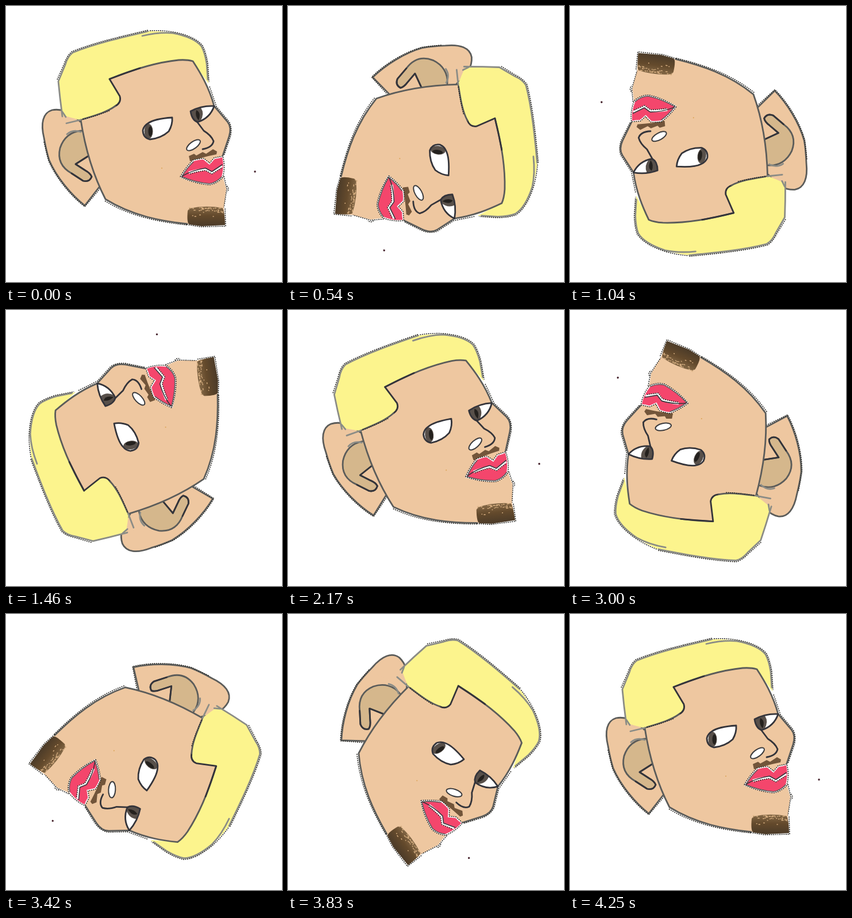
An HTML page that plays this animation: 480 px wide and 480 px high, repeating every 4.29 s.

```html
<!DOCTYPE html>
<html lang="en">
<head>
<meta charset="utf-8">
<title>Turning head</title>
<style>
  html, body { margin: 0; width: 100%; height: 100%; overflow: hidden; background: #fff; }
  svg { display: block; width: 100vw; height: 100vh; }
  .line { fill: none; stroke: #5b5c5a; stroke-width: 2.8; stroke-linecap: round; stroke-linejoin: round; }
  .soft { stroke: #8b8c86; }
  .dark { stroke: #34343a; }
  .thin { stroke-width: 1.6; }
  .rough { fill: none; stroke: #2b2a26; stroke-width: 1.6; stroke-dasharray: 2 1.6; }
  .skin { fill: #eec7a0; }
  .hair { fill: #fcf48d; }
  .lip { fill: #f4466c; }
  .white { fill: none; stroke: #fff; stroke-width: 4.5; stroke-linejoin: round; }
</style>
</head>
<body>
<svg viewBox="0 0 480 480">
  <defs>
    <linearGradient id="beardTone" x1="0" y1="0" x2="0" y2="1">
      <stop offset="0" stop-color="#866a48"/>
      <stop offset=".45" stop-color="#644a2c"/>
      <stop offset="1" stop-color="#4a3a28"/>
    </linearGradient>
    <path id="earEdge" d="M129 201C114 184 95 178 80 181C64 186 60 204 66 229Q70 252 75 268C88 298 113 328 137 347L162 315"/>
    <path id="innerEar" d="M131 217C113 218 100 229 94 247C89 268 98 282 114 291L134 304Q145 307 149 297Q147 291 138 286L121 275L143 261"/>
    <path id="lips" d="M305 297Q314 282 326 270Q336 267 343 267L354 276L363 266Q371 265 376 263Q380 278 375 297Q366 307 354 309Q330 307 305 297Z"/>
    <path id="leftEye" d="M247 204Q258 196 289 194Q290 206 283 218Q270 230 250 232Q238 229 238 216Q240 208 247 204Z"/>
    <path id="rightEye" d="M321 183Q340 173 362 174Q355 195 333 202Q323 198 321 183Z"/>
  </defs>
  <g id="head">
    <!-- ear -->
    <use href="#earEdge" class="skin"/>
    <path class="skin" d="M129 201L162 315L137 347L80 230Z"/>
    <use href="#innerEar" fill="#d5b78c"/>
    <use href="#earEdge" class="line"/>
    <path class="rough" d="M66 236Q70 254 74 269C87 299 112 330 137 349L164 317"/>
    <use href="#innerEar" class="line"/>
    <path class="line dark" d="M114 291L134 304Q145 307 149 297Q147 291 138 286L121 275L143 261"/>

    <!-- face and hair -->
    <path class="skin" d="M130 197L180 127C217 112 261 98 300 94Q315 93 325 96C338 116 353 141 362 174L385 201Q393 211 388 227L377 260L378 300L383 318L379 350L380 381L315 379C269 374 220 365 173 336C154 299 138 250 130 197Z"/>
    <path class="hair" d="M133 197C153 191 175 185 190 174Q201 168 198 157L180 127C217 112 261 98 300 94Q315 93 325 96L352 135L349 100Q346 81 340 70Q327 54 290 47Q266 43 244 44C208 53 155 65 116 81Q107 90 103 102L91 129L94 160L99 190Q112 194 128 198Z"/>
    <path class="line soft" d="M98 192L94 160L91 131L103 102Q107 88 116 81C155 65 208 53 247 44M237 52Q266 45 290 47Q327 54 340 70Q346 81 349 100L351 128"/>
    <path class="rough" d="M89 128L101 101Q106 86 115 79C155 63 208 51 247 42M250 43Q270 42 290 45Q328 52 342 69Q348 81 351 100L353 132"/>
    <path class="line" d="M180 127C217 112 261 98 300 94Q315 93 325 96C338 116 353 141 362 174L385 201Q393 211 388 227L377 260"/>
    <path class="line dark" d="M233 108Q206 117 180 127L198 157Q201 168 190 174"/>
    <path class="line" d="M190 174C175 185 153 191 133 197"/>
    <path class="rough" d="M180 182Q158 191 131 198M354 140L366 175L388 201Q394 213 390 228L379 260"/>
    <path class="line" d="M130 198C138 250 154 299 173 336C220 365 269 374 315 379"/>
    <path class="rough" d="M172 339C218 367 269 376 316 381M379 296L384 318L379 350"/>
    <path class="line soft" d="M105 204L130 198M106 223Q116 214 130 219M104 193L98 184"/>

    <!-- eyes -->
    <use href="#leftEye" fill="#fff"/>
    <ellipse cx="248" cy="218" rx="7.5" ry="13" fill="#58504a"/>
    <ellipse cx="251" cy="218" rx="3.5" ry="9" fill="#24211e"/>
    <use href="#leftEye" class="line dark"/>
    <use href="#rightEye" fill="#fff"/>
    <path fill="#58504a" d="M321 183L339 177Q346 188 338 200L333 202Q323 198 321 183Z"/>
    <path fill="#24211e" d="M331 181Q340 185 335 199Q328 191 331 181Z"/>
    <use href="#rightEye" class="line dark"/>

    <!-- nose -->
    <path class="line dark" d="M332 201L344 217Q357 225 361 235Q359 246 342 249"/>
    <ellipse cx="326" cy="242" rx="14" ry="6" transform="rotate(-36 326 242)" fill="#fff" stroke="#3a3a3c" stroke-width="2"/>

    <!-- moustache and mouth -->
    <path fill="#72553a" d="M318 261L327 257L331 260L342 254L348 257L360 249L367 253L366 258L352 261L340 264L329 268L320 270Z"/>
    <use href="#lips" class="white"/>
    <use href="#lips" class="lip"/>
    <path class="white" d="M318 290Q330 286 347 284L358 290L376 278"/>
    <path class="rough" d="M303 297Q313 280 325 268Q336 265 344 265L354 273L362 264L377 261Q382 279 377 298Q367 309 354 311Q328 309 303 297"/>
    <path class="line thin" d="M306 297Q314 282 326 271M306 297Q330 307 354 309Q366 307 375 297"/>
    <path class="line dark thin" d="M306 296Q325 285 347 282L358 288L376 276"/>
    <path class="rough" d="M320 292Q332 288 347 286L358 292L376 281"/>

    <!-- beard -->
    <path fill="url(#beardTone)" d="M319 352Q346 346 376 351Q380 353 381 381L340 383L319 380Q314 378 316 356Z"/>
    <path class="rough" d="M314 380L338 384L382 383L381 352"/>
    <g id="specks" fill="#d9b183"></g>

    <circle cx="271" cy="282" r="1" fill="#dba456"/>
    <path class="rough" d="M384 313Q389 317 385 323"/>
    <circle cx="433" cy="288" r="1.7" fill="#43202a"/>
  </g>
</svg>
<script>
  const LOOP = 4290, FRAME = 1000 / 24, STEP = 7.5, REST = 51.2;
  const head = document.getElementById("head");
  const specks = document.getElementById("specks");

  let seed = 11;
  const rand = () => (seed = (seed * 16807) % 2147483647) / 2147483647;
  for (let i = 0; i < 42; i++) {
    const dot = document.createElementNS("http://www.w3.org/2000/svg", "rect");
    const box = { x: 318 + rand() * 58, y: 350 + rand() * rand() * 20, width: 1 + rand() * 3, height: 1.4 };
    for (const key in box) dot.setAttribute(key, box[key].toFixed(1));
    specks.append(dot);
  }

  // One turn clockwise, a short rest, one turn back, a short rest.
  const angleAt = frame => frame < REST
    ? Math.min(360, frame * STEP)
    : Math.max(0, 360 - (frame - REST) * STEP);

  const start = performance.now();
  function draw() {
    const time = (performance.now() - start) % LOOP;
    const frame = Math.floor((time + 5) / FRAME);
    head.setAttribute("transform", `rotate(${angleAt(frame % 103)} 240 240)`);
    requestAnimationFrame(draw);
  }
  draw();
</script>
</body>
</html>
```
